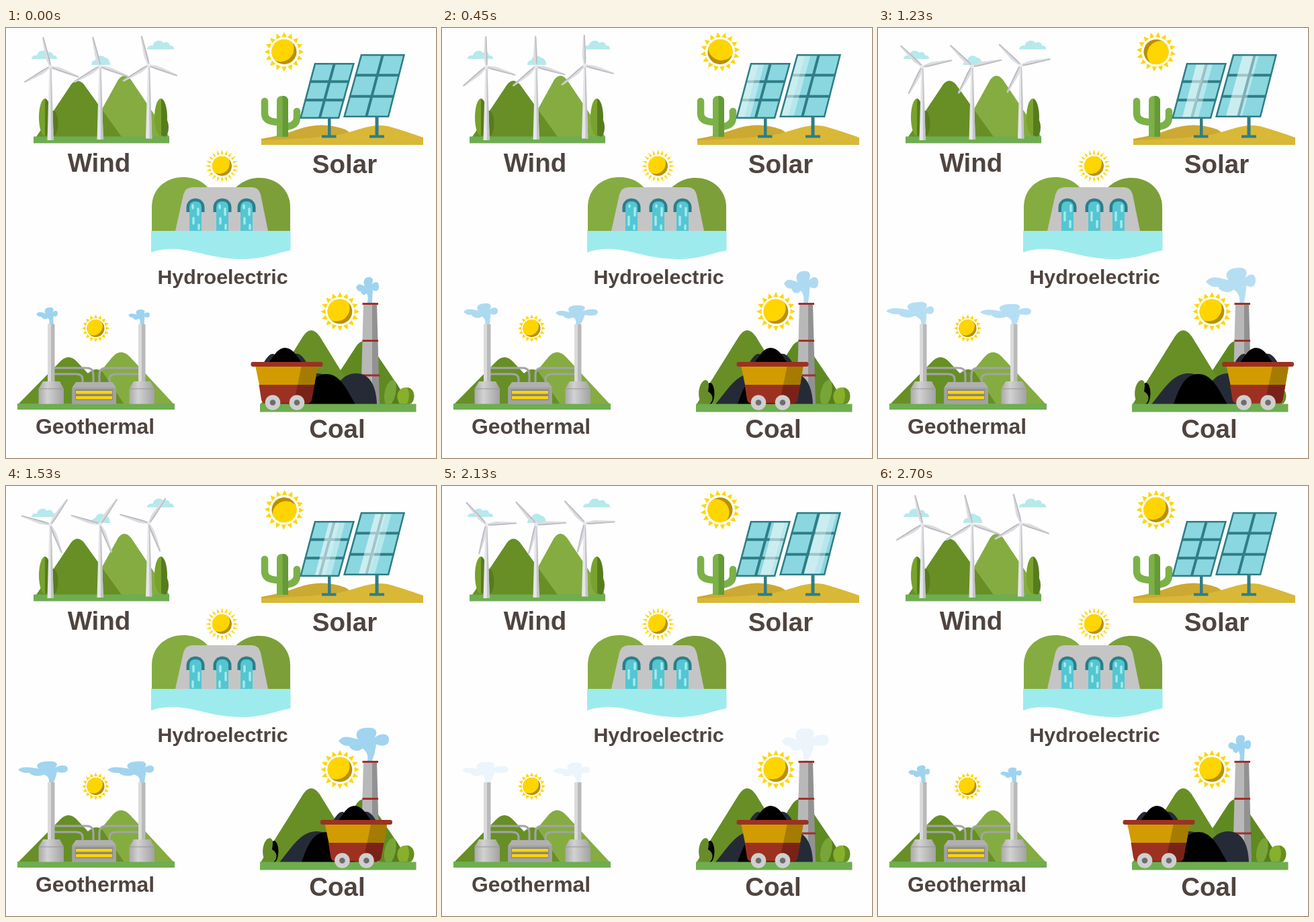
An HTML page that plays this animation: 640x640 px, repeating every 2730 ms.

```html
<!DOCTYPE html>
<html lang="en">
<head>
<meta charset="utf-8">
<title>Energy sources</title>
<style>
html, body { margin: 0; width: 100%; height: 100%; overflow: hidden; background: #fefefe; }
svg { display: block; width: 100vw; height: 100vh; }
text { font-family: "Liberation Sans", Arial, sans-serif; font-weight: bold; fill: #4f443f; text-anchor: middle; }
</style>
</head>
<body>
<svg viewBox="0 0 640 640">
<defs>
  <linearGradient id="pipe"><stop offset=".5" stop-color="#dadada"/><stop offset=".5" stop-color="#b9b9b9"/></linearGradient>
  <linearGradient id="tank"><stop offset="0" stop-color="#a9a9a9"/><stop offset=".35" stop-color="#d2d2d2"/><stop offset="1" stop-color="#a2a2a2"/></linearGradient>
  <linearGradient id="leaf"><stop offset=".5" stop-color="#78a22c"/><stop offset=".5" stop-color="#577c1e"/></linearGradient>
  <linearGradient id="brick"><stop offset=".6" stop-color="#b8b8b8"/><stop offset=".6" stop-color="#929292"/></linearGradient>
  <clipPath id="clip1"><path d="M459 52H519L496 135H437Z"/></clipPath>
  <clipPath id="clip2"><path d="M528 39H594L570 133H502Z"/></clipPath>
  <path id="cloud" d="M0 13C0 9 4 7 8 8C9 1 19-2 23 4C28 1 32 4 32 8C36 7 38 10 38 13Z"/>
  <g id="plant">
    <rect x="62" y="441" width="10.500" height="86" fill="url(#pipe)"/>
    <path d="M55 526H80L86 537V559.500H48.500V537Z" fill="url(#tank)"/>
    <path d="M48.500 537H86" stroke="#969696"/>
  </g>
</defs>

<g id="wind">
  <g fill="#b5e9ec">
    <use href="#cloud" x="38" y="33"/>
    <path d="M127 55C127 50 130 48 133 48C134 41 143 39 147 44C152 44 155 49 155 55Z"/>
    <use href="#cloud" transform="translate(210 18) scale(1.06)"/>
  </g>
  <path d="M120 162L167 77Q176 65 186 77L243 162Z" fill="#85ac41"/>
  <path d="M45 162L97 84Q106 73 116 84L172 162Z" fill="#678f26"/>
  <ellipse cx="70" cy="142" rx="7.500" ry="19" fill="#577c1e"/>
  <ellipse cx="58" cy="133" rx="9" ry="28" fill="url(#leaf)"/>
  <ellipse cx="236" cy="148" rx="6" ry="14" fill="#577c1e"/>
  <ellipse cx="230.500" cy="133" rx="9.500" ry="28" fill="url(#leaf)"/>
  <path d="M41 161.500H243V171.500H41Z" fill="#6fad50"/>
</g>

<g id="solar">
  <path d="M380 174V165Q410 160 434 151Q470 138 505 151L540 174Z" fill="#cba933"/>
  <path d="M380 174V167Q470 164 500 158C530 150 545 142 568 146Q590 152 621 163V174Z" fill="#d9b837"/>
  <g fill="none" stroke="#7cb148" stroke-width="10.500" stroke-linecap="round">
    <path d="M385 109V127Q385 140 406 140M433 124V133Q433 146 415 147"/>
  </g>
  <path d="M403 162V109Q403 101 411.500 101Q420 101 420 109V162Z" fill="#7cb148"/>
  <path d="M411.500 101Q420 101 420 109V162H411.500Z" fill="#659a37"/>
  <path d="M479 135H483.500V159.500H491.500V163.500H470V159.500H479ZM549.500 132H554.500V159.500H563V163.500H541V159.500H549.500Z" fill="#2f7d86"/>
</g>

<g id="hydro">
  <path d="M217 303V267C217 236 242 222 264 222C292 222 318 240 320 303Z" fill="#85ac41"/>
  <path d="M320 303C320 245 350 223 377 223C402 223 423 240 423 267V303Z" fill="#7c9f39"/>
  <path d="M252 302L264 248Q267 237 278 237H366Q376 237 379 248L390 302Z" fill="#c5c5c5"/>
  <path d="M216 302H423.500V331C405 334 385 344 350 344C305 344 275 327 242 329Q226 330 216 334Z" fill="#9eebee"/>
</g>

<g id="geo">
  <path d="M18 560L80 497Q93 483 106 497L165 560Z" fill="#678f26"/>
  <path d="M100 560L159 489Q171 476 184 489L250 560Z" fill="#85ac41"/>
  <path d="M100 560V530L126 511Q134 505 143 511L176 560Z" fill="#678f26"/>
  <path d="M17 559H251V568H17Z" fill="#6fad50"/>
  <g fill="none" stroke="#a2a4a5" stroke-width="3.200">
    <path d="M72 506H120Q130 506 130 516V528M72 515H104Q114 515 114 523V528M198 506H149Q139 506 139 516V528M198 515H164Q154 515 154 523V528"/>
  </g>
  <path d="M104 527H158L164 535V559.500H98.500V535Z" fill="#b0b0b0"/>
  <path d="M98.500 535H164V559.500H98.500Z" fill="#a1a2a3"/>
  <path d="M103 538H159V554H103Z" fill="#858789"/>
  <path d="M104 540H158V544.500H104ZM104 548H158V552.500H104Z" fill="#ffd400"/>
  <use href="#plant"/><use href="#plant" x="135"/>
</g>

<g id="coal">
  <path d="M465 560L521 474Q532 458 544 474L602 560Z" fill="#5f8a22"/>
  <path d="M379 560L442 459Q454 441 467 459L529 560Z" fill="#678f26"/>
  <path d="M532 410H552L556 560H528Z" fill="url(#brick)"/>
  <path d="M530.500 409H554V412H530.500ZM530.500 464H554V467H530.500ZM529 515.500H556V518.500H529Z" fill="#a0302a"/>
  <g fill="#252b36">
    <path d="M407 560C424 540 438 514 462 514C486 514 498 535 505 560Z"/>
    <path d="M485 560C488 532 501 514 521 514C543 514 551 535 552 560Z"/>
  </g>
  <path d="M440 560C448 537 456 515 477 515C498 515 508 540 520 560Z"/>
  <ellipse cx="399" cy="544" rx="6.500" ry="16"/>
  <path d="M386 559C378 545 384 525 392 524C399 524 397 536 396 541C405 546 404 555 398 560Z" fill="#668d29"/>
  <path d="M565 559C559 548 567 525 575 524C584 524 586 548 579 559Z" fill="#78a636"/>
  <path d="M574 559Q583 545 580 527Q590 540 584 559Z" fill="#577c1e"/>
  <path d="M586 559C578 548 584 535 595 535C608 535 611 552 603 559Z" fill="#87b02c"/>
  <path d="M597 559Q603 546 597 535C609 536 610 552 603 559Z" fill="#668f22"/>
  <path d="M378 559.500H610.500V571.500H378Z" fill="#6fad50"/>
</g>

<g font-size="38.500">
  <text x="138.500" y="213.500">Wind</text>
  <text x="504" y="216">Solar</text>
  <text x="322.500" y="381" font-size="30.400">Hydroelectric</text>
  <text x="132.500" y="603.500" font-size="31.900">Geothermal</text>
  <text x="493" y="609.500">Coal</text>
</g>
</svg>

<script>
const LOOP = 2730, STEP = 30, TURN = 1350;
const $ = id => document.getElementById(id);

function add(parent, tag, attrs) {
  const el = document.createElementNS("http://www.w3.org/2000/svg", tag);
  for (const k in attrs) el.setAttribute(k, attrs[k]);
  return parent.appendChild(el);
}
const path = (parent, d, fill, more) => add(parent, "path", { d, fill, ...more });
const group = (parent, x, y) => add(parent, "g", { transform: `translate(${x} ${y})` });

// Linear interpolation through rows of [time, ...values]
function track(rows, t) {
  let i = 1;
  while (i < rows.length - 1 && t > rows[i][0]) i++;
  const a = rows[i - 1], b = rows[i];
  const k = Math.min(1, Math.max(0, (t - a[0]) / (b[0] - a[0])));
  return a.slice(1).map((v, j) => v + (b[j + 1] - v) * k);
}

function sun(parent, x, y, r, inner, outer, rays, half) {
  const g = add(group(parent, x, y), "g", {});
  for (let i = 0; i < rays; i++)
    path(g, `M${-half} ${-inner}L0 ${-outer}L${half} ${-inner}Z`, "#ffd500", { transform: `rotate(${i * 360 / rays})` });
  add(g, "circle", { r, fill: "#b98f00" });
  // lit part, leaving a crescent at lower right
  const c = r * 0.707;
  path(g, `M${c} ${-c}A${r} ${r} 0 1 0 ${-c} ${c}A${r * 1.08} ${r * 1.08} 0 0 0 ${c} ${-c}Z`, "#ffd500");
  return g;
}

function turbine(x, y, foot) {
  const g = group($("wind"), x, y), h = foot - y;
  path(g, `M-1.500 0H1.500L4.800 ${h}H-4.500Z`, "#e6e6e9");
  path(g, `M.3 0H1.500L4.800 ${h}H1Z`, "#c3c4c8");
  const rotor = add(g, "g", {});
  for (const a of [0, 107, 231]) {
    const b = add(rotor, "g", { transform: `rotate(${a})` });
    path(b, "M-1.500 0C-2-8-4-10-3.500-18L-1.500-44Q0-47 1-44L2-12L1.500 0Z", "#dcdde0");
    path(b, "M0 0L-.5-44Q.5-47 1-44L2-12L1.500 0Z", "#bcbdc2");
  }
  add(g, "circle", { r: 2.8, fill: "#e9e9ec" });
  return rotor;
}

function panel(n, [x1, x2, x3, x4], top, bottom) {
  const g = $("solar"), mix = (a, b, k) => a + (b - a) * k;
  const edge = `M${x1} ${top}H${x2}L${x3} ${bottom}H${x4}Z`;
  const box = add(g, "g", { "clip-path": `url(#clip${n})` });
  let lines = `M${(x1 + x2) / 2} ${top}L${(x3 + x4) / 2} ${bottom}`;
  for (const k of [1 / 3, 2 / 3])
    lines += `M${mix(x1, x4, k)} ${mix(top, bottom, k)}H${mix(x2, x3, k)}`;
  path(box, edge, "#8ad7df");
  path(box, lines, "none", { stroke: "#2f7d86", "stroke-width": 4 });
  const d = x4 - x1, h = bottom - top;
  const shine = group(box, x1, top);
  const band = (a, b, o) => path(shine, `M${a} 0H${b}L${b + d} ${h}H${a + d}Z`, "#fff", { opacity: o });
  band(-12, 4, 0.55);
  band(4, 12, 0.38);
  path(g, edge, "none", { stroke: "#2f7d86", "stroke-width": 5, "clip-path": `url(#clip${n})` });
  return { shine, x: x1, y: top };
}

function spout(x) {
  const g = group($("hydro"), x, 0);
  path(g, "M-13.500 274V267A13.500 13.500 0 0 1 13.500 267V274Z", "#2b7f89");
  path(g, "M-9 274V267A9 9 0 0 1 9 267V274Z", "#245f69");
  path(g, "M-9 302V267Q-9 258 0 258Q9 258 9 267V302Z", "#53c6d2");
  return [[-4, 0, 12], [4, 13, 9], [-3, 27, 8], [5, 37, 11]].map(([dx, at, len]) => ({
    at, len, x: dx, el: path(g, "", "none", { stroke: "#a5ebee", "stroke-width": 3.4, "stroke-linecap": "round" })
  }));
}

// Plume reaching l to the left, r to the right and h upward from the stack
function plume(l, r, h) {
  const p = (x, y) => `${(x < 0 ? x * l : x * r).toFixed(1)} ${(-y * h).toFixed(1)} `;
  return `M-3 0Q-1 ${-0.25 * h} ${p(-.22, .38)}C${p(-.35, .25)}${p(-.6, .3)}${p(-.66, .46)}` +
    `Q${p(-.85, .42)}${p(-1, .6)}C${p(-.85, .8)}${p(-.65, .72)}${p(-.36, .65)}` +
    `C${p(-.5, .8)}${p(-.4, 1)}${p(-.1, 1)}C${p(.4, 1.04)}${p(.45, .85)}${p(.25, .7)}` +
    `C${p(.55, .85)}${p(1, .85)}${p(1, .65)}C${p(1, .46)}${p(.7, .42)}${p(.35, .5)}` +
    `Q${p(.3, .25)}4 0Z`;
}

function smoke(x, y, rows) {
  return { rows, el: add(group($(y > 420 ? "geo" : "coal"), x, y), "path", { fill: "#9ed3ef" }) };
}

function makeCart() {
  const g = add($("coal"), "g", {});
  path(g, "M383 499C390 487 395 483 400 486L412 499ZM420 499L430 485C437 483 443 490 448 499Z", "#252b36");
  path(g, "M390 499C398 491 402 477 415 476C428 476 434 491 441 499Z", "#000");
  path(g, "M371 502H464L459 531H377Z", "#d29b00");
  path(g, "M440 502H464L459 531H434Z", "#a57b00");
  path(g, "M376.500 531H459L455 553Q454 558.500 448 558.500H387Q381 558.500 380 553Z", "#9c3122");
  path(g, "M434 531H459L455 553Q454 558.500 448 558.500H428Z", "#7a2218");
  add(g, "rect", { x: 364.5, y: 497, width: 107, height: 7, rx: 3, fill: "#9c3122" });
  for (const cx of [397, 433]) {
    add(g, "circle", { cx, cy: 557.5, r: 11.3, fill: "#cfcfcf" });
    add(g, "circle", { cx, cy: 557.5, r: 4.3, fill: "#6d6d6d" });
  }
  return g;
}

const bigSun = sun($("solar"), 414, 35.5, 18.5, 22, 29.5, 16, 3.8);
sun($("hydro"), 321.5, 205.5, 14.5, 17.5, 25, 20, 1.7);
sun($("geo"), 133.5, 447, 13, 15, 20.5, 16, 2.7);
sun($("coal"), 497, 422, 18.3, 21.5, 29, 16, 3.8);

const rotors = [turbine(66, 57.5, 167), turbine(140, 57, 166), turbine(212.5, 55.5, 164.5)];
const panels = [panel(1, [459, 519, 496, 437], 52, 135), panel(2, [528, 594, 570, 502], 39, 133)];
const drops = [282, 322, 358].flatMap(spout);
const cart = makeCart();
const plumes = [
  smoke(541, 409, [[0, 20, 14, 38], [450, 32, 19, 47], [780, 42, 20, 51], [1230, 53, 21, 52],
    [1530, 46, 29, 49], [2130, 35, 35, 48], [2700, 20, 14, 38]]),
  smoke(67, 441, [[0, 22, 10, 25], [450, 35, 16, 31], [780, 45, 28, 29], [1230, 55, 16, 33],
    [1530, 49, 25, 31], [2130, 37, 32, 30], [2700, 22, 10, 25]]),
  smoke(202, 441, [[0, 20, 12, 22], [450, 33, 30, 28], [780, 34, 36, 26], [1230, 50, 26, 30],
    [1530, 51, 18, 31], [2130, 37, 18, 29], [2700, 20, 12, 22]])
];
const FADE = [[0, 1], [180, .97], [450, .83], [780, .2], [900, .15], [1230, .75], [1350, 1]];
const SHINE = [[0, -15], [450, 9], [780, 17], [2130, 48], [2700, 80]];
const ROLL = [[0, 0], [330, 74], [900, 74], [1200, 147.5], [1350, 147.5], [1650, 74], [2280, 74], [2670, 0]];

function draw(t) {
  const turn = 239 + t / TURN * 360;
  rotors.forEach(r => r.setAttribute("transform", `rotate(${turn})`));
  bigSun.setAttribute("transform", `rotate(${t / (2 * TURN) * 360})`);
  const [sx] = track(SHINE, t);
  panels.forEach(p => p.shine.setAttribute("transform", `translate(${p.x + sx} ${p.y})`));
  for (const d of drops) {
    const y = 256 + (d.at + t / 900 * 50) % 50;
    const a = Math.max(264, y), b = Math.min(299, y + d.len);
    d.el.setAttribute("d", b > a ? `M${d.x} ${a}V${b}` : "");
  }
  const [alpha] = track(FADE, t % TURN);
  for (const s of plumes) {
    s.el.setAttribute("d", plume(...track(s.rows, t)));
    s.el.setAttribute("opacity", alpha);
  }
  cart.setAttribute("transform", `translate(${track(ROLL, t)[0]} 0)`);
}

const start = performance.now();
function tick() {
  const t = (performance.now() - start) % LOOP;
  draw(Math.floor(t / STEP) * STEP);
  requestAnimationFrame(tick);
}
tick();
</script>
</body>
</html>
```
